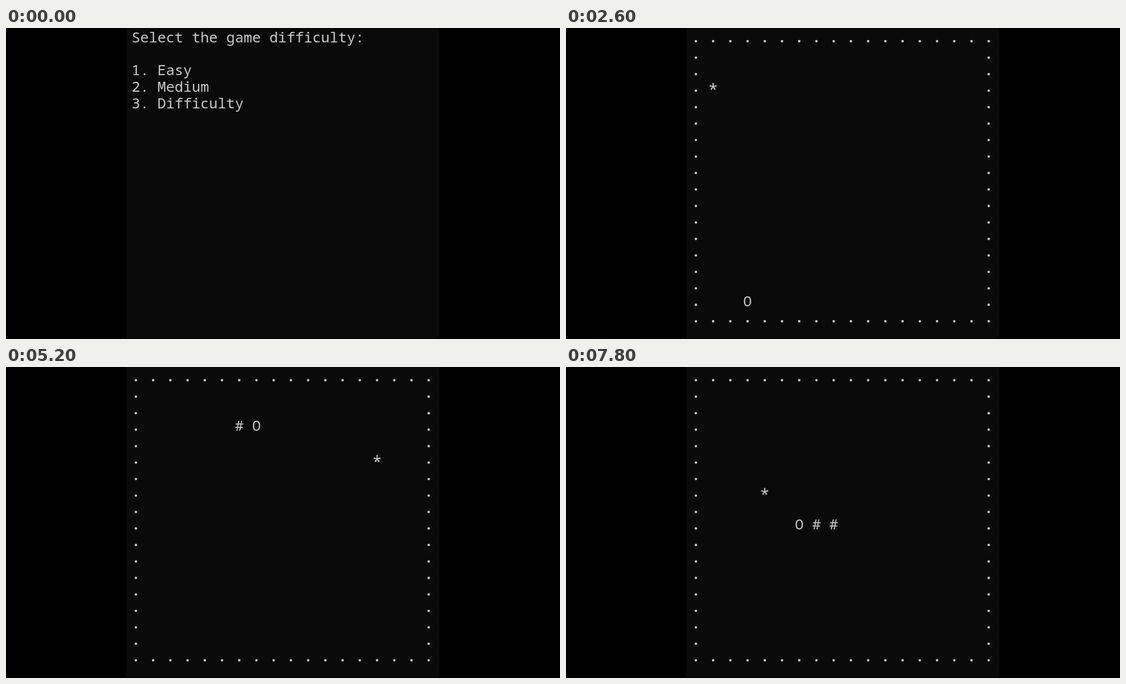
Animation, 998 px wide and 561 px high, one loop 8 s. Source, as an HTML page with a canvas:

```html
<!DOCTYPE html>
<html lang="en">
<head>
<meta charset="utf-8">
<title>Terminal snake</title>
<style>
  html, body { margin: 0; width: 100%; height: 100%; overflow: hidden; background: #000; }
  canvas { display: block; }
</style>
</head>
<body>
<canvas id="stage" width="998" height="561"></canvas>
<script>
const ctx = document.getElementById('stage').getContext('2d');
const LOOP = 8000, TICK = 200, MOVE = 124;
const START = 902, TYPED = 600, BOARD = 1200;
const REDRAWS = [1200, 4800];
const SIZE = 18, CELL = 31.03, LINE = 29.72;
const INK = '#c8c8c8';

const MENU = ['Select the game difficulty:', '', '1. Easy', '2. Medium', '3. Difficulty'];
const ROUTE = [[9, 9], [9, 16], [1, 16], [1, 3], [14, 3], [14, 9], [6, 9]];
const FOOD = [[1, 3], [14, 5], [4, 7]];

// Expand the corners into one cell per move.
const trail = [ROUTE[0]];
for (const [col, row] of ROUTE.slice(1)) {
  let [c, r] = trail[trail.length - 1];
  while (c !== col || r !== row) {
    c += Math.sign(col - c);
    r += Math.sign(row - r);
    trail.push([c, r]);
  }
}

// Move at which each piece of food is reached, in order.
const meals = [];
for (const [col, row] of FOOD.slice(0, 2)) {
  const from = meals.length ? meals[meals.length - 1] : 0;
  meals.push(trail.findIndex(([c, r], i) => i > from && c === col && r === row));
}

const font = px => `${px}px "Noto Sans Mono", "DejaVu Sans Mono", monospace`;
const centerX = col => 234 + col * CELL;
const baseline = row => 26 + row * LINE;

function glyph(char, [col, row], px = 25.85, drop = 0) {
  ctx.font = font(px);
  ctx.textAlign = 'center';
  ctx.fillText(char, centerX(col), baseline(row) + drop);
}

function drawMenu(time) {
  ctx.font = font(25.85);
  ctx.textAlign = 'left';
  MENU.forEach((text, row) => ctx.fillText(text, 226.3, baseline(row)));
  if (time >= TYPED) ctx.fillText('3', 226.3, baseline(6));
}

function drawBorder(time) {
  ctx.globalAlpha = REDRAWS.includes(time) ? 0.5 : 1;
  for (let row = 0; row < SIZE; row++) {
    const step = row % (SIZE - 1) ? SIZE - 1 : 1;
    for (let col = 0; col < SIZE; col += step) {
      ctx.beginPath();
      ctx.arc(centerX(col), 23.8 + row * LINE, 2.2, 0, Math.PI * 2);
      ctx.fill();
    }
  }
  ctx.globalAlpha = 1;
}

function drawGame(time) {
  const move = Math.min(Math.floor((time - START) / MOVE), trail.length - 1);
  const eaten = meals.filter(m => move >= m).length;
  drawBorder(time);
  glyph('*', FOOD[eaten], 30, 8);
  for (let i = eaten; i > 0; i--) glyph('#', trail[move - i]);
  glyph('O', trail[move]);
}

function draw(now) {
  const time = Math.floor((now % LOOP) / TICK) * TICK;
  ctx.fillStyle = '#000';
  ctx.fillRect(0, 0, 998, 561);
  ctx.fillStyle = '#0a0a0a';
  ctx.fillRect(217, 0, 564, 560);
  ctx.fillStyle = INK;
  if (time < BOARD) drawMenu(time);
  else drawGame(time);
}

let origin;
function frame(now) {
  origin ??= now;
  draw(now - origin);
  requestAnimationFrame(frame);
}
draw(0);
requestAnimationFrame(frame);
</script>
</body>
</html>
```
